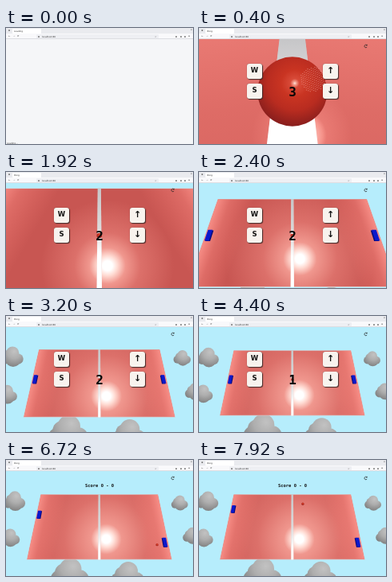
These frames come from a looping animation (234 by 146 pixels, 8 s). An HTML page with a canvas:

```html
<!DOCTYPE html>
<html lang="en">
<head>
<meta charset="utf-8">
<title>Pong</title>
<style>
html, body { margin: 0; width: 100%; height: 100%; overflow: hidden; background: #f5f6f8; }
#stage { position: absolute; left: 0; top: 0; width: 234px; height: 146px; overflow: hidden; }
#stage * { position: absolute; box-sizing: border-box; white-space: pre; }
canvas { left: 0; top: 0; width: 234px; height: 146px; }
.tabs { left: 0; top: 0; width: 234px; height: 7px; background: #eaebef; }
.tab { left: 8px; top: 1px; width: 36px; height: 6px; border-radius: 1px; background: #fff; }
.bar { left: 0; top: 7px; width: 234px; height: 7px; background: #f9f9fb; border-bottom: .5px solid #dcdde2; }
.url { left: 38px; top: 1px; width: 153px; height: 5px; border-radius: 1px; background: #eeeff3; }
.tiny { font: 2.8px/4px "DejaVu Sans", sans-serif; color: #333; }
.dot { width: 2px; height: 2px; border: .6px solid #555; border-radius: 1px; }
.key { width: 19px; height: 19px; border-radius: 3px; background: #f8f3ee;
  box-shadow: 1px 1px 1px #422a28, 0 0 1px #5a3a38;
  font: bold 8.5px/17px "DejaVu Sans", sans-serif; color: #111; text-align: center; }
.arrow { font-size: 11px; }
#count { left: 97px; top: 71px; width: 40px; text-align: center; color: #080808;
  font: bold 16px/20px "DejaVu Sans Mono", monospace; }
#score { left: 87px; top: 28px; width: 60px; text-align: center; color: #111;
  font: bold 5.45px/8px "DejaVu Sans Mono", monospace; }
#turn { left: 206px; top: 20px; }
</style>
</head>
<body>
<div id="stage">
  <canvas id="view"></canvas>
  <div id="hud">
    <div class="key" style="left:60px;top:45px">W</div>
    <div class="key" style="left:60px;top:70px">S</div>
    <div class="key arrow" style="left:155px;top:45px">↑</div>
    <div class="key arrow" style="left:155px;top:70px">↓</div>
    <div id="count">3</div>
  </div>
  <div id="score">Score 0 - 0</div>
  <svg id="turn" width="6" height="6" viewBox="0 0 6 6"><path d="M4 1.6A1.8 1.8 0 1 0 4.2 4M4.3 .8V2H3" fill="none" stroke="#222" stroke-width=".7"/></svg>
  <div class="tabs">
    <div class="dot" style="left:3px;top:2px"></div>
    <div class="tab"><div class="tiny" id="title" style="left:2px;top:1px">Pong</div></div>
    <div class="tiny" style="right:1px;top:0">×</div>
  </div>
  <div class="bar">
    <div class="tiny" style="left:3px;top:1px">←</div>
    <div class="tiny" style="left:9px;top:1px;color:#999">→</div>
    <div class="tiny" style="left:14px;top:1px">⟳</div>
    <div class="url">
      <div class="dot" style="left:2px;top:1.5px"></div>
      <div class="tiny" style="left:7px;top:.5px">localhost:80</div>
      <div class="tiny" style="left:148px;top:.5px">☆</div>
    </div>
    <div class="dot" style="left:212px;top:2.5px"></div>
    <div class="dot" style="left:218px;top:2.5px"></div>
    <div class="dot" style="left:223px;top:2.5px"></div>
    <div class="tiny" style="left:228px;top:1px">≡</div>
  </div>
  <div class="tiny" id="status" style="left:1px;top:143px">Loading…</div>
</div>
<script>
const LOOP = 8000, STEP = 80, START = 160, SERVE = 5290;
const CX = 116.8, CY = 80;
const el = id => document.getElementById(id);
const canvas = el('view'), g = canvas.getContext('2d');
const ratio = Math.max(1, window.devicePixelRatio || 1);
canvas.width = 234 * ratio;
canvas.height = 146 * ratio;
g.scale(ratio, ratio);

// [time, values...]
const BALL = [[SERVE, 0, 0], [5520, .135, -.18], [6368, .63, -.93], [6735, .84, -.6], [7920, .172, .65], [8000, .127, .735]];
const LEFT = [[4900, 0], [5520, .165], [6300, .165], [7400, .46]];
const RIGHT = [[5280, 0], [5520, .105], [5700, .105], [6650, -.556]];
// x, y, size, drift phase
const CLOUDS = [[11, 52, 13, 0], [5, 98, 12, 1], [217, 54, 10, 2], [232, 95, 11, 3], [79, 145, 23, 4], [152, 147, 20, 5]];
const PUFFS = [[-.55, .2, .48], [.55, .2, .5], [.05, -.35, .6], [-.3, -.15, .5], [.1, .25, .7]];

function along(keys, t) {
  if (t <= keys[0][0]) return keys[0].slice(1);
  for (let i = 1; i < keys.length; i++) {
    const a = keys[i - 1], b = keys[i];
    if (t <= b[0]) {
      const p = (t - a[0]) / (b[0] - a[0]);
      return a.slice(1).map((v, j) => v + (b[j + 1] - v) * p);
    }
  }
  return keys[keys.length - 1].slice(1);
}

function distance(t) {
  const p = Math.min(1, Math.max(0, (t - 200) / 3480));
  return 4.8 + 95.2 * (p < .5 ? 2 * p * p : 1 - 2 * (1 - p) ** 2);
}

// table plane (u, v in -1..1) to screen; points near the camera are clipped
function project(u, v, d) {
  const tilt = 10.6 + (100 - d) * .085;
  const rise = 100 * Math.sqrt(42 ** 2 - tilt ** 2);
  const w = Math.max(v, -.8 * d / tilt);
  const depth = d + tilt * w;
  return [CX + 8129 * u / depth, CY - rise * w / depth];
}

function poly(points, fill) {
  g.beginPath();
  points.forEach(p => g.lineTo(p[0], p[1]));
  g.closePath();
  g.fillStyle = fill;
  g.fill();
}

const quad = (u0, u1, v0, v1, d) =>
  [project(u0, v1, d), project(u1, v1, d), project(u1, v0, d), project(u0, v0, d)];

function shade(fill, stops) {
  stops.forEach(s => fill.addColorStop(s[0], s[1]));
  return fill;
}

const radial = (x, y, r, stops) => shade(g.createRadialGradient(x, y, 0, x, y, r), stops);

function disc(x, y, r, fill) {
  g.beginPath();
  g.arc(x, y, r, 0, 7);
  g.fillStyle = fill;
  g.fill();
}

function cloud([x, y, size, phase], d, t) {
  const k = 100 / d, sway = Math.sin(t / 1500 + phase);
  const px = CX + (x - CX) * k + sway * .6, py = CY + (y - CY) * k + sway * .3, r = size * k;
  const fill = radial(px + r * .2, py - r * .5, r * 1.5, [[0, '#c2c2c2'], [.45, '#aeaeae'], [1, '#808080']]);
  PUFFS.forEach(([a, b, c]) => disc(px + a * r, py + b * r, c * r, fill));
}

// light falling in from one long side, fading along its normal
function sideLight(side, felt, d) {
  const [x0, y0] = project(side, 1, d), [x1, y1] = project(side, -1, d);
  const len = Math.hypot(x1 - x0, y1 - y0), reach = side * 3300 / d;
  const nx = -(y1 - y0) / len * reach, ny = (x1 - x0) / len * reach;
  poly(felt, shade(g.createLinearGradient(x0, y0, x0 + nx, y0 + ny),
    [[0, 'rgba(255,152,144,.85)'], [.35, 'rgba(255,140,132,.4)'], [1, 'rgba(255,130,122,0)']]));
}

function table(d) {
  const y = CY + 57.5 - .38 * d, x = 128.5 - .03 * d;
  const reach = 60 + .45 * d, core = 11 - .03 * d;
  poly(quad(-1, 1, -1, 1, d), '#dcc0c0');
  const light = radial(x, y, reach, [
    [0, '#fff'], [core * .65 / reach, '#fff'], [core * 1.3 / reach, '#ffdcd4'],
    [core * 2.4 / reach, '#f0978e'], [.5, '#dc706a'], [1, '#c85652']]);
  for (const side of [-1, 1]) {
    const felt = quad(side * .016, side * .993, -.985, .988, d);
    poly(felt, light);
    sideLight(side, felt, d);
  }
  const top = Math.max(14, project(0, 1, d)[1]);
  poly(quad(-.016, .016, -1, 1, d), shade(g.createLinearGradient(0, top, 0, 146),
    [[0, '#c6c6c8'], [.4, '#dcdadb'], [.65, '#fff']]));
}

function paddle(u, v, d) {
  const base = quad(u - .026, u + .026, v - .125, v + .125, d);
  const k = 100 / d, lift = base.map(([x, y]) => [x + Math.sign(u) * k, y - .5 * k]);
  poly(base, '#060b78');
  poly([base[3], base[2], lift[2], lift[3]], '#080d86');
  poly(lift, '#0b18cc');
}

function ball(u, v, d) {
  const [x, y] = project(u, v, d), r = 165 / (d - 1.65);
  disc(x, y, r, radial(x + r * .07, y - r * .24, r * 1.3, [
    [0, '#ffe6dc'], [.035, '#f4a090'], [.1, '#d84a38'], [.3, '#c93422'], [.6, '#b92c20'], [1, '#821c1c']]));
  if (r < 5) return;
  g.save();
  g.translate(x + r * .57, y - r * .37);
  g.rotate(.35);
  g.fillStyle = 'rgba(240,165,155,.6)';
  const gap = r * .058;
  for (let i = -6; i <= 6; i++) {
    for (let j = -6; j <= 6; j++) {
      if (i * i + j * j < 38) g.fillRect(i * gap + (j & 1) * gap / 2, j * gap, gap * .45, gap * .45);
    }
  }
  g.restore();
}

function draw(t) {
  const live = t >= START, playing = t >= SERVE - 50;
  el('hud').style.display = live && !playing ? 'block' : 'none';
  el('score').style.display = playing ? 'block' : 'none';
  el('turn').style.display = live ? 'block' : 'none';
  el('status').style.display = live ? 'none' : 'block';
  el('title').textContent = live ? 'Pong' : 'Loading';
  el('count').textContent = t < 1920 ? 3 : t < 3600 ? 2 : 1;
  g.fillStyle = live ? '#b6edfc' : '#f5f6f8';
  g.fillRect(0, 0, 234, 146);
  if (!live) return;
  const d = distance(t);
  CLOUDS.forEach(c => cloud(c, d, t));
  table(d);
  paddle(-.945, along(LEFT, t)[0], d);
  paddle(.94, along(RIGHT, t)[0], d);
  ball(...along(BALL, t), d);
}

const begin = performance.now();
function tick() {
  const t = (performance.now() - begin) % LOOP;
  draw(Math.floor(t / STEP) * STEP);
  requestAnimationFrame(tick);
}
tick();
</script>
</body>
</html>
```
